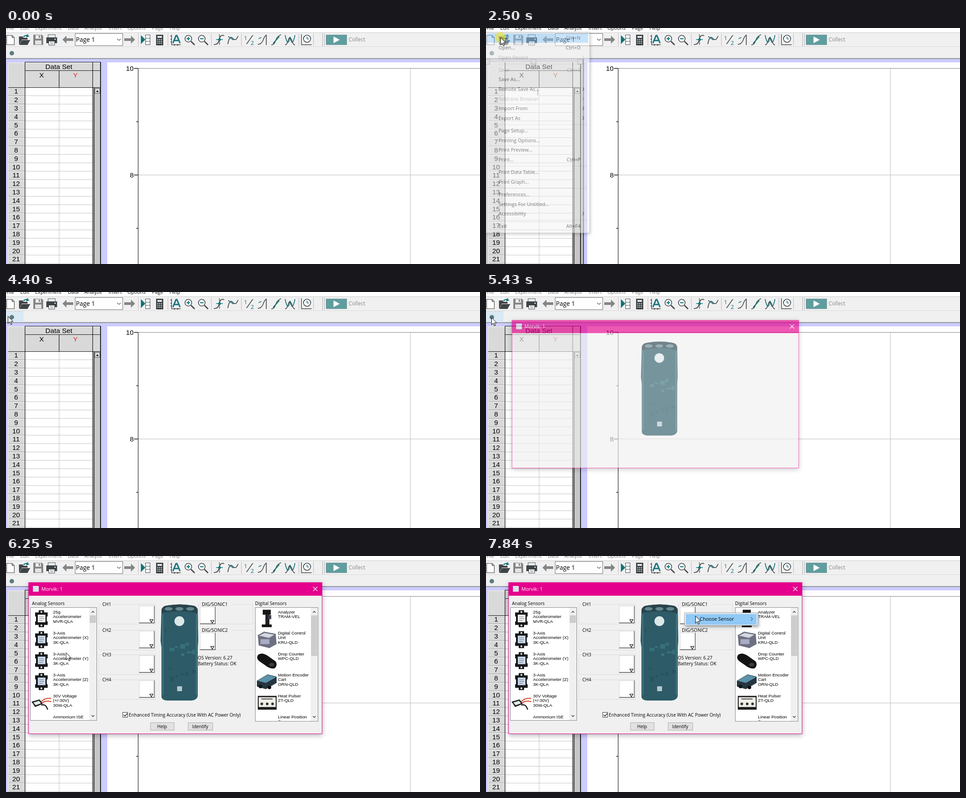
An HTML page that plays this animation: 1058 by 529 pixels, repeating every 8 s.

```html
<!DOCTYPE html>
<html lang="en">
<head>
<meta charset="utf-8">
<title>Sensor setup</title>
<style>
html, body { margin: 0; width: 100%; height: 100%; overflow: hidden; background: #fff; }
svg { display: block; width: 1058px; height: 529px; }
text { font-family: "Open Sans", "Noto Sans", sans-serif; white-space: pre; }
.arial text, text.arial { font-family: "Liberation Sans", Arial, sans-serif; }
.shadow { filter: drop-shadow(2px 3px 3px rgba(0, 0, 0, .35)); }
.deep { filter: drop-shadow(0 3px 6px rgba(0, 0, 0, .3)); }
</style>
</head>
<body>
<svg id="stage" viewBox="0 0 1058 529" xmlns="http://www.w3.org/2000/svg"></svg>
<script>
const TEAL = '#12717a', DARK = '#3f4447', MAGENTA = '#e4008c', LAVENDER = '#ccccff';

// Markup helpers
const rect = (x, y, w, h, fill, stroke) =>
  `<rect x="${x}" y="${y}" width="${w}" height="${h}" fill="${fill}"${stroke ? ` stroke="${stroke}"` : ''}/>`;
const path = (d, stroke, width = 1, fill = 'none') =>
  `<path d="${d}" stroke="${stroke}" stroke-width="${width}" fill="${fill}"/>`;
const shape = (d, fill) => path(d, 'none', 0, fill);
const dot = (x, y, r, fill, stroke = 'none', width = 1) =>
  `<circle cx="${x}" cy="${y}" r="${r}" fill="${fill}" stroke="${stroke}" stroke-width="${width}"/>`;
const oval = (x, y, rx, ry, fill) => `<ellipse cx="${x}" cy="${y}" rx="${rx}" ry="${ry}" fill="${fill}"/>`;
const text = (x, y, s, size = 11, fill = '#000', anchor = 'start', cls = '') =>
  `<text x="${x}" y="${y}" font-size="${size}" fill="${fill}" text-anchor="${anchor}" class="${cls}">${s}</text>`;
const group = (id, body, cls = '') => `<g id="${id}" class="${cls}">${body}</g>`;
const each = (list, fn) => list.map(fn).join('');
const range = n => [...Array(n).keys()];
const chevron = (x, y, c) => path(`M${x - 2} ${y - 4}l4 4-4 4`, c);

function menuBar() {
  const items = [['File', 1], ['Edit', 32], ['Experiment', 65], ['Data', 138], ['Analyze', 175],
    ['Insert', 229], ['Options', 271], ['Page', 326], ['Help', 365]];
  return group('bar', each(items, ([s, x]) => text(x, 4, s, 11, 'inherit')));
}

function toolbar() {
  const lens = (x, sign) => dot(x, 24, 7.5, '#fff', DARK, 1.6) +
    path(`M${x + 6} 30l8 8`, DARK, 2.6) + path(sign, TEAL, 2.2);
  const arrow = (x, s) => shape(`M${x} 26l${9 * s}-9v6h${15 * s}v6h${-15 * s}v6z`, '#858585');
  return rect(0, 0, 1058, 10, '#fff') + rect(0, 10, 1058, 59, '#f0f0f0') +
    path('M0 10.5H1058', '#c9c9c9') + path('M0 42.5H1058', '#cfcfcf') + path('M0 43.5H1058', '#fff') +
    path('M0 68.5H1058', '#777', 1.6) +
    // document, folder, disk, printer
    path('M1.5 16.5h12l5 5v16h-17zM13.5 16.5v5h5', '#444', 1.2, '#fff') +
    shape('M29 19h8l2 3h9v4h-13l-5 11h-1z', DARK) + shape('M35 27h19l-6 11H30z', DARK) +
    path('M39 20q4-5 9-2', TEAL, 2.4) + shape('M47 13l5 6-7 2z', TEAL) +
    shape('M61 15h19l3 3v20H61z', '#858585') + rect(66, 16, 12, 8, '#eee') + rect(73, 17, 3, 5, '#858585') +
    rect(65, 28, 14, 9, '#e4e4e4') +
    rect(94, 15, 16, 8, '#f4f4f4', DARK) + rect(90, 21, 24, 13, DARK) + rect(95.5, 29.5, 13, 9, '#fff', DARK) +
    path('M98 32.5h8M98 35.5h8', '#777') + rect(108, 24, 3, 2, '#fff') +
    arrow(126, 1) + arrow(288, -1) +
    rect(154.5, 12.5, 106, 27, '#fff', '#707070') + text(156, 31, 'Page 1', 13.8) + path('M248 24l4 4 4-4', '#555', 1.2) +
    each([295, 361, 458, 525, 653, 686], x => path(`M${x}.5 13V40`, '#b8b8b8')) +
    // table, calculator, graph, zoom
    shape('M301 16l10 10-10 10z', TEAL) + rect(311.5, 15.5, 10, 22, '#fff', DARK) + path('M311 23h11M311 30h11', DARK) +
    rect(335, 15, 16, 24, DARK) + rect(338, 18, 10, 4, '#e8e8e8') +
    each(range(9), i => rect(338 + i % 3 * 4, 25 + (i / 3 | 0) * 4, 2, 2, '#e8e8e8')) +
    path('M369.5 15V37.5H390M367 18h3M367 25h3M367 31h3M376 36v4M383 36v4', DARK, 1.4) +
    path('M372.5 34L379.5 17h2L388.5 34M375.5 28h10', TEAL, 3) +
    lens(407, 'M403 24h8M407 20v8') + lens(437, 'M433 24h8') +
    // analysis tools
    path('M464 37q10 1 12-11t11-9', DARK, 1.8) + path('M476.5 14v24M469 26h15', TEAL, 1.4) + dot(476.5, 26, 3, TEAL) +
    path('M495 36q4-21 11-13t12-5', DARK, 1.8) + path('M496 19l12 8', TEAL, 1.8) +
    text(531, 27, '1', 13, TEAL) + path('M537 36L551 16', DARK, 1.6) + text(546, 38, '2', 13, TEAL) +
    path('M562 37q9-1 12-10t7-11v22', DARK, 1.6) + path('M564 24l6-3', TEAL, 1.5) +
    path('M592 38q7 0 10-10t12-13', DARK, 1.5) + path('M596 35l14-16', TEAL, 2) +
    path('M623 16q6 30 11 4q5 26 11-4', TEAL, 1.8) + path('M623 38q5-1 7-11t8 0q2 10 7 11', DARK, 1.5) +
    path('M659.5 14V37.5H682', DARK, 1.4) + dot(672, 24, 8, '#fff', DARK, 1.6) + path('M672 19v5.5h4', TEAL, 1.5) +
    path('M706.5 12V41M710.5 12V41', '#b0b0b0') +
    rect(714.5, 15.5, 46, 22, '#5f9ea0', '#7a9b9d') + shape('M731 19l14 7.500-14 7.500z', '#fff') +
    text(765, 30, 'Collect', 11.8, '#888') +
    rect(0, 43, 39, 25, '#d9e9f5').replace('<rect', '<rect id="hover"') + dot(13, 56.5, 5, '#5b7c80');
}

function table() {
  const rowY = i => 133 + 18.8 * i;
  return rect(0, 69, 1058, 460, LAVENDER) + rect(4, 77, 208, 452, '#d9d9d9') +
    rect(43, 134, 151, 395, '#fff') +
    each(range(22), i => path(`M43 ${rowY(i + 1).toFixed(1)}H193`, '#c2c2c2') +
      path(`M5 ${rowY(i + 1).toFixed(1)}H42`, '#8c8c8c') +
      path(`M5 ${(rowY(i + 1) + 1).toFixed(1)}H42`, '#fff') +
      text(22.500, 147.4 + 18.8 * i, i + 1, 15.5, '#000', 'middle')) +
    path('M118.5 134V529', '#c2c2c2') + path('M4.5 77V529M4 78H212', '#f4f4f4') +
    path('M118.5 95V133M42.5 77V529M193.5 77V529M42 95.5H212M5 133.5H212M42 76.500H212', '#111', 1.2) +
    rect(195, 134, 16, 395, '#c6c6c6') + path('M196.5 134V529', '#111', 1.5) + path('M211 77V529', '#222', 2) +
    rect(198.5, 135.5, 11, 11, '#dcdcdc', '#555') + shape('M201 143.500h6l-3-4z', '#000') +
    text(118, 92, 'Data Set', 15.5, '#000', 'middle') + text(79.5, 111, 'X', 15.5, '#000', 'middle') +
    text(155, 111, 'Y', 15.5, '#e02a16', 'middle');
}

function plot() {
  return rect(226, 77, 832, 452, '#fff') + path('M902.5 91V529M295 329.5H1058', '#bababa') +
    path('M286 90.5H1058', '#808080', 1.2) + path('M295 91V529', '#555', 1.6) +
    path('M286 90.5h9M286 329.5h9M291 210h4M291 449h4', '#111', 1.3) +
    text(285, 96, '10', 15.5, '#000', 'end') + text(285, 335, '8', 15.5, '#000', 'end');
}

function selection() {
  return group('selected', shape('M0 70H217V529H212V77H4V529H0z', '#c2c2ca') + path('M217.5 70V529', '#222', 1.6) +
    each([3, 106, 210], x => rect(x - 5.5, 70.5, 11, 11, '#c9c9c9', '#7a7a7a')) +
    rect(43, 134, 74, 20, '#fff') + path('M115.5 135V151', '#3a7fc0', 1.4) +
    text(118, 92, 'Data Set', 15.5, '#000', 'middle'), 'arial');
}

function fileMenu() {
  // label, y, shortcut (or > for a submenu), disabled
  const items = [['New', 22, 'Ctrl+N'], ['Open...', 44, 'Ctrl+O'], ['Open Recent', 66, '>', 1], ['Save', 94, 'Ctrl+S', 1],
    ['Save As...', 115], ['Remote Save As...', 137, '>'], ['Toldrane Browser', 159, '>', 1], ['Import From', 180, '>'],
    ['Export As', 202, '>'], ['Page Setup...', 230], ['Printing Options...', 252], ['Print Preview...', 273],
    ['Print...', 295, 'Ctrl+P'], ['Print Data Table...', 323], ['Print Graph...', 345], ['Preferences...', 373],
    ['Settings For Untitled...', 395], ['Accessibility', 416, '>'], ['Exit', 444, 'Alt+F4']];
  return group('file', rect(-1, 9.5, 232.5, 450, '#f2f2f2', '#979797') +
    rect(2, 12, 226, 21, '#91c9f7').replace('<rect', '<rect id="newRow"') +
    each([80, 216, 309, 359, 430], y => path(`M27 ${y}.5H226`, '#d0d0d0')) +
    each(items, ([s, y, key, off]) => {
      const c = off ? '#8d8d8d' : '#000';
      return text(28, y + 4, s, 11, c) +
        (key === '>' ? chevron(217, y, c) : key ? text(211, y + 4, key, 11, c, 'end') : '');
    }), 'shadow');
}

function device() {
  return shape('M347 122Q348 112 360 111Q388 106 416 111Q427 112 428 122L429 190L428 205V314Q426 323 414 324H360Q348 323 347 316V205L345 190z', '#2d5b67') +
    shape('M347 122Q348 112 360 111Q388 106 416 111Q427 112 428 122L427 128Q388 119 348 128z', '#29434b') +
    each([363, 387, 411], x => oval(x, 118.5, 9, 4, '#628791')) +
    path('M350 130V312M425 130V312', '#4a7a86', 2) +
    each(range(14), i => rect(354 + i * 37 % 62, 165 + i * 53 % 110, 5 + i % 4 * 2, 4 + i % 3 * 3, i % 2 ? '#37707c' : '#295360')) +
    dot(387, 146, 11, '#dce8ea') + rect(382, 292, 11, 11, '#b5c8cd');
}

// Sensor thumbnails, drawn around (0, 0)
const tagged = label => shape('M-6-19H6V-14H14V-5H12V6H14V14H6V19H-6V14H-14V6H-12V-5H-14V-14H-6z', '#17181a') +
  rect(-8, -9, 17, 17, label) + path('M-5-4H5M-5 0H6M-5 4H3', '#777') + dot(0, -15, 2, '#fff') + dot(0, 15, 2, '#fff');
const thumbs = {
  plain: tagged('#f4f4f4'),
  axis: tagged('#c9d7ea'),
  leads: path('M-4 4Q4-12 22-9M-2 4Q8-6 22-2', '#d23c1c', 2) + path('M0 6Q10 2 14 16', '#222', 2.5) +
    shape('M-22-2L-4-7L3 3L-14 10z', '#1b1f1f') + shape('M-18 0L-5-4L-1 2L-13 6z', '#e3ebe8'),
  stand: rect(-9, -20, 18, 11, '#151515') + rect(-3, -10, 9, 28, '#222') + rect(-11, 13, 22, 6, '#111') + rect(3, -8, 7, 9, '#3a3a48'),
  unit: shape('M-20-10L-6-18L20-13L22 10L6 19L-18 13z', '#6d7182') + shape('M-17-9L-5-15L17-11L5-4z', '#d5d8e2') +
    rect(-14, -1, 20, 11, '#a9acc4'),
  drop: shape('M-20-12Q-12-20 2-11L20 2Q25 10 18 17Q8 20-4 10L-17 1Q-24-5-20-12z', '#141414') + oval(11, 9, 6, 4, '#3c3c3c'),
  cart: shape('M-22-2L2-16L22-11V3L-2 17L-22 11z', '#25363f') + shape('M-21-2L2-15L21-10L-2 3z', '#5c93ab') +
    dot(-14, 11, 4, '#111') + dot(6, 13, 4, '#111'),
  pulser: rect(-20, -15, 42, 31, '#1c1c1c') + rect(-18, -12, 38, 22, '#f0eee6') + path('M-12-8H13', '#444', 2) +
    each([-11, 1, 13], x => dot(x, 3, 3, '#333')),
  rail: rect(-20, -5, 40, 9, '#c4c4c4') + dot(0, 3, 9, '#2a2a2a') + dot(0, 3, 4, '#ddd')
};

function sensorList(x, w, h, thumbX, textX, thumbSize, items) {
  const right = x + w, clip = 'clip' + x;
  return `<clipPath id="${clip}">${rect(x, 116, w - 17, h - 2, '#000')}</clipPath>` +
    rect(x + .5, 115.5, w, h, '#fff', '#82878f') + rect(right - 16, 116, 16, h - 1, '#f0f0f0') +
    rect(right - 15, 133, 14, thumbSize, '#cdcdcd') +
    path(`M${right - 11} 127l3-3 3 3M${right - 11} ${h + 104}l3 3 3-3`, '#444', 1.5) +
    `<g clip-path="url(#${clip})">` + each(items, ([kind, ...lines]) => kind) .slice(0, 0) +
    items.map(([kind, ...lines], i) =>
      `<g transform="translate(${thumbX} ${140.5 + 47 * i})">${thumbs[kind]}</g>` +
      lines.map((s, n) => text(textX, 128.5 + 47 * i + 10.7 * n, s, 9.8, '#000', 'start', 'arial')).join('')).join('') + '</g>';
}

function channel(label, x, y, w, boxX, boxY) {
  return rect(x + .5, y + .5, w, 44, 'none', '#dcdcdc') + rect(x + 6, y - 4, label.length * 6.4 + 4, 10, '#f0f0f0') +
    text(x + 8, y + 4, label, 10.2) + rect(boxX + .5, boxY + .5, 33, 37, '#fff', '#d8d8d8') +
    path(`M${boxX} ${boxY + 38}h34v-38`, '#555', 1.3) +
    path(`M${boxX + 24} ${boxY + 30.5}h7l-3.500 6z`, '#000', 1.2, '#fff');
}

function dialog() {
  const label = (x, y, s) => text(x, y, s, 10.2);
  const button = (x, w, s) => rect(x + .5, 373.5, w, 17, '#e1e1e1', '#adadad') + text(x + w / 2, 386, s, 10.2, '#000', 'middle');
  const left = [['plain', '25g', 'Accelerometer', 'MVR-QLA'],
    ...each(['X', 'Y', 'Z'], c => c).split('').map(c => ['axis', '3-Axis', `Accelerometer (${c})`, '3K-QLA']),
    ['leads', '30V Voltage', '(+/-30V)', '30W-QLA'], ['plain', 'Ammonium ISE']].map((r, i) => i < 5 ? r : ['none', r[1]]);
  const right = [['stand', 'Analyzer', 'TRAM-VEL'], ['unit', 'Digital Control', 'Unit', 'KRU-QLD'],
    ['drop', 'Drop Counter', 'WPC-QLD'], ['cart', 'Motion Encoder', 'Cart', 'ORN-QLD'],
    ['pulser', 'Heat Pulser', 'ZT-QLD'], ['rail', 'Linear Position', 'Sensor']];
  const controls = label(58, 110, 'Analog Sensors') + label(556, 110, 'Digital Sensors') +
    sensorList(54, 148, 253, 79, 105, 17, left) + sensorList(556, 140, 255, 582, 607, 91, right) +
    each([[1, 108, 112], [2, 166, 168], [3, 221, 223], [4, 277, 279]], ([n, y, b]) => channel('CH' + n, 207, y, 126, 297, b)) +
    channel('DIG/SONIC1', 429, 108, 121, 433, 114) + channel('DIG/SONIC2', 429, 166, 121, 433, 172) +
    label(428, 232, 'OS Version: 6.27') + label(428, 245, 'Battery Status: OK') +
    rect(260.5, 350.5, 11, 11, '#fff', '#333') + path('M262.500 356l3 3 5-6', '#111', 1.4) +
    label(274, 360, 'Enhanced Timing Accuracy (Use With AC Power Only)') +
    button(322, 53, 'Help') + button(406, 55, 'Identify');
  return group('dialog', rect(50.5, 59.5, 655, 339, '#f0f0f0', MAGENTA) + rect(50, 59, 656, 30, MAGENTA) +
    rect(60, 67, 13, 13, '#dbe6ea') + text(79, 78, 'Morvik: 1', 11, '#fff') +
    path('M685.5 69l9.500 9.500M695 69l-9.500 9.500', '#fff', 1.2) + group('controls', controls) + device(), 'deep');
}
thumbs.none = '';

function popup() {
  return group('popup', rect(443.5, 127.5, 163, 28, '#f2f2f2', '#a5a5a5') +
    rect(446, 130, 158, 24, '#91c9f7').replace('<rect', '<rect id="choose"') +
    text(477, 145, 'Choose Sensor') + chevron(593, 141, '#222'), 'shadow');
}

const stage = document.getElementById('stage');
stage.innerHTML = group('data', table() + plot(), 'arial') + toolbar() + menuBar() + selection() + fileMenu() + dialog() + popup() +
  '<circle id="click" fill="#f2e41c"/>' +
  group('cursor', path('M.5.5V16.500L4.200 13L6.800 19L9.200 18L6.700 12.200H11.800z', '#000', 1, '#fff'));
const el = Object.fromEntries([...stage.querySelectorAll('[id]')].map(n => [n.id, n]));

// Timing tables
const LOOP = 8000;
const PATH = [[530, 383, 351], [740, 250, 215], [1000, 90, 90], [1160, 8, 34], [1300, 17, 21], [1360, 16, 14], [1430, 13, 5],
  [1970, 13, 5], [2040, 20, 13], [2100, 32, 21], [3900, 32, 21], [4000, 33, 13], [4200, 17, 34], [4400, 4, 54],
  [4600, 7, 56], [4740, 12, 57], [5980, 12, 57], [6250, 133, 216], [6420, 235, 247], [6810, 418, 152],
  [6880, 430, 146], [7090, 455, 136], [7290, 455, 136], [7430, 467, 134], [LOOP, 467, 134]];
const CLICKS = [[1630, 13, 5], [2500, 32, 21], [5290, 12, 57], [7290, 455, 136]];
const FILE = [[1630, .42], [1700, .8], [1770, 1], [2500, .5], [2570, 0]];
const DIALOG = [[5360, .25], [5430, .65], [5500, .9], [5560, 1]];
const ZOOM = [[5360, .95], [5430, .977], [5500, .994], [5560, 1]];
const POPUP = [[7360, .3], [7430, .65], [7500, .9], [7570, 1]];

const step = (table, t) => table.reduce((v, [at, next]) => t >= at ? next : v, 0);
const show = (node, on) => node.setAttribute('visibility', on ? 'inherit' : 'hidden');
const fade = (node, a) => { node.style.opacity = a; show(node, a > 0); };

function pointer(t) {
  const i = Math.max(1, PATH.findIndex(k => k[0] > t));
  const [t0, x0, y0] = PATH[i - 1], [t1, x1, y1] = PATH[i];
  const u = Math.max(0, (t - t0) / (t1 - t0));
  return [x0 + (x1 - x0) * u, y0 + (y1 - y0) * u];
}

function render(t) {
  el.bar.setAttribute('fill', t >= 1630 && t < 5290 ? '#111' : '#777');
  show(el.selected, t >= 1700 && t < 3310);
  show(el.hover, t >= 4270 && t < 6040);
  fade(el.file, step(FILE, t));
  show(el.newRow, t >= 2040 && t < 2570);
  if (t >= 2570) show(el.newRow, false);
  fade(el.dialog, step(DIALOG, t));
  const z = step(ZOOM, t);
  el.dialog.setAttribute('transform', `translate(378 229) scale(${z || 1}) translate(-378 -229)`);
  show(el.controls, t >= 5640);
  fade(el.popup, step(POPUP, t));
  show(el.choose, t >= 7840);
  const click = CLICKS.find(c => t >= c[0] && t < c[0] + 130);
  show(el.click, click);
  if (click) {
    const u = (t - click[0]) / 130;
    el.click.setAttribute('cx', click[1]);
    el.click.setAttribute('cy', click[2]);
    el.click.setAttribute('r', 12 + 8 * u);
    el.click.setAttribute('fill-opacity', .55 * (1 - u));
  }
  show(el.cursor, t >= 530);
  el.cursor.setAttribute('transform', `translate(${pointer(t).map(v => v.toFixed(1))})`);
}

const start = performance.now();
function tick() {
  render((performance.now() - start) % LOOP);
  requestAnimationFrame(tick);
}
render(0);
tick();
</script>
</body>
</html>
```
